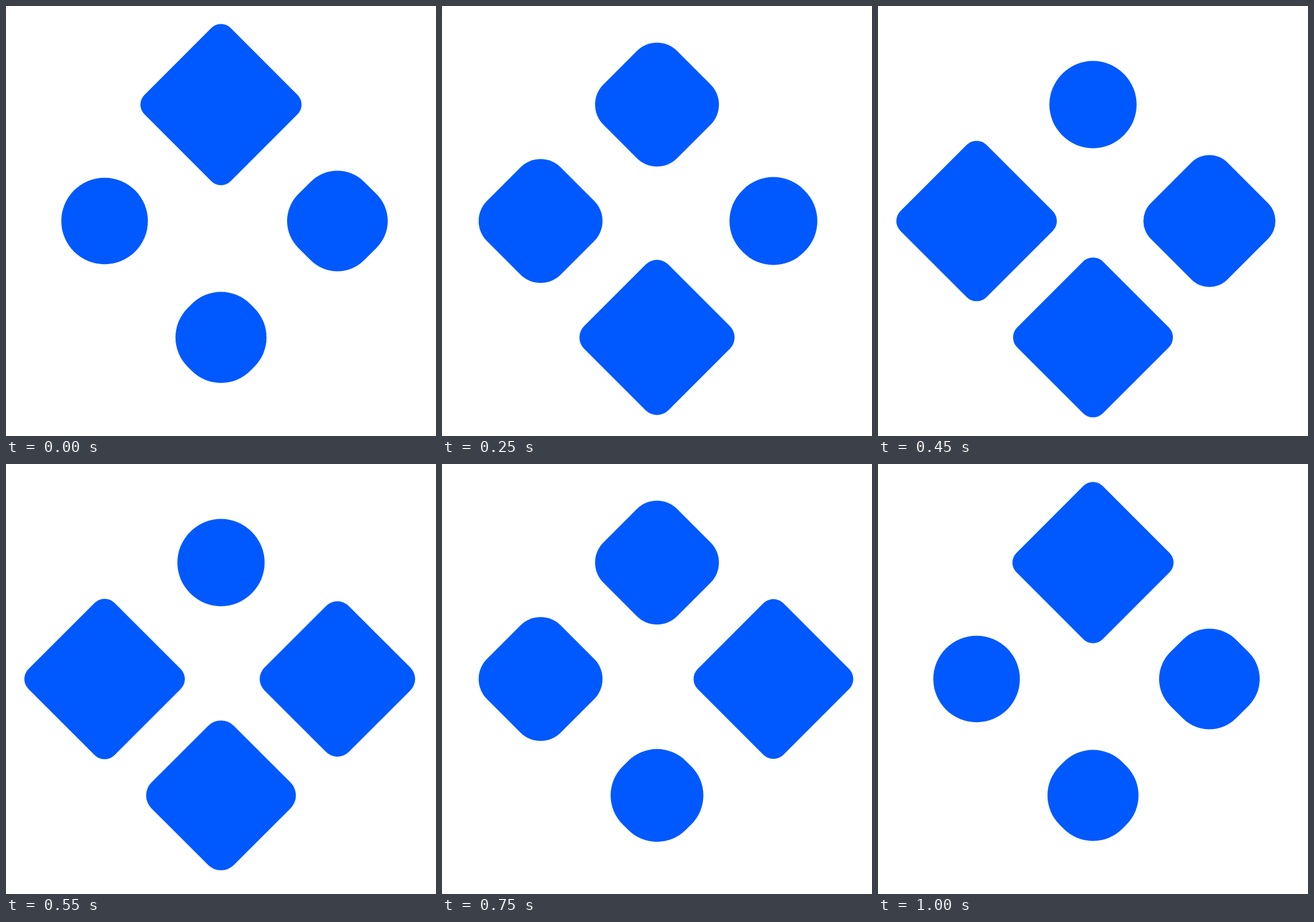
Recreate the animation shown at these times as an HTML page with a canvas. Size 748 by 748 pixels, loop 1.02 s.

```html
<!DOCTYPE html>
<html>
<head>
<meta charset="utf-8">
<style>
  html, body { margin: 0; width: 100%; height: 100%; overflow: hidden; background: #fff; }
  canvas { display: block; }
</style>
</head>
<body>
<canvas id="stage" width="748" height="748"></canvas>
<script>
const ctx = document.getElementById("stage").getContext("2d");
const LOOP = 1020, PERIOD = 1000, STEP = 25;

// Centre, time of the full diamond, time of the full circle (ms)
const shapes = [
  { x: 374, y: 171.5, diamond: 0, circle: 500 },
  { x: 171.5, y: 374, diamond: 500, circle: 0 },
  { x: 576.5, y: 374, diamond: 678, circle: 183 },
  { x: 374, y: 576.5, diamond: 381, circle: 884 }
];

const mix = (a, b, k) => a + (b - a) * k;
const wrap = t => (t % PERIOD + PERIOD) % PERIOD;

// cubic-bezier(.65, 0, .35, 1), solved by bisection
function ease(x) {
  let lo = 0, hi = 1;
  for (let i = 0; i < 30; i++) {
    const u = (lo + hi) / 2, v = 1 - u;
    if (1.95 * v * v * u + 1.05 * v * u * u + u * u * u < x) lo = u;
    else hi = u;
  }
  return lo * lo * (3 - 2 * lo);
}

// 0 = circle, 1 = diamond
function morph({ diamond, circle }, t) {
  const fall = wrap(circle - diamond), since = wrap(t - diamond);
  return since < fall
    ? 1 - ease(since / fall)
    : ease((since - fall) / (PERIOD - fall));
}

function draw(t) {
  ctx.fillStyle = "#fff";
  ctx.fillRect(0, 0, 748, 748);
  ctx.fillStyle = "#0059ff";
  for (const s of shapes) {
    const k = morph(s, t);
    const half = mix(75.3, 106.1, k), radius = mix(75.3, 23.8, k);
    ctx.save();
    ctx.translate(s.x, s.y);
    ctx.rotate(Math.PI / 4);
    ctx.beginPath();
    ctx.roundRect(-half, -half, 2 * half, 2 * half, radius);
    ctx.fill();
    ctx.restore();
  }
}

// Poses are 25 ms apart, shown on a 10 ms clock
function tick() {
  const ms = Math.floor(performance.now() % LOOP / 10) * 10;
  draw(Math.floor((ms + 5) / STEP) * STEP);
  requestAnimationFrame(tick);
}
tick();
</script>
</body>
</html>
```
